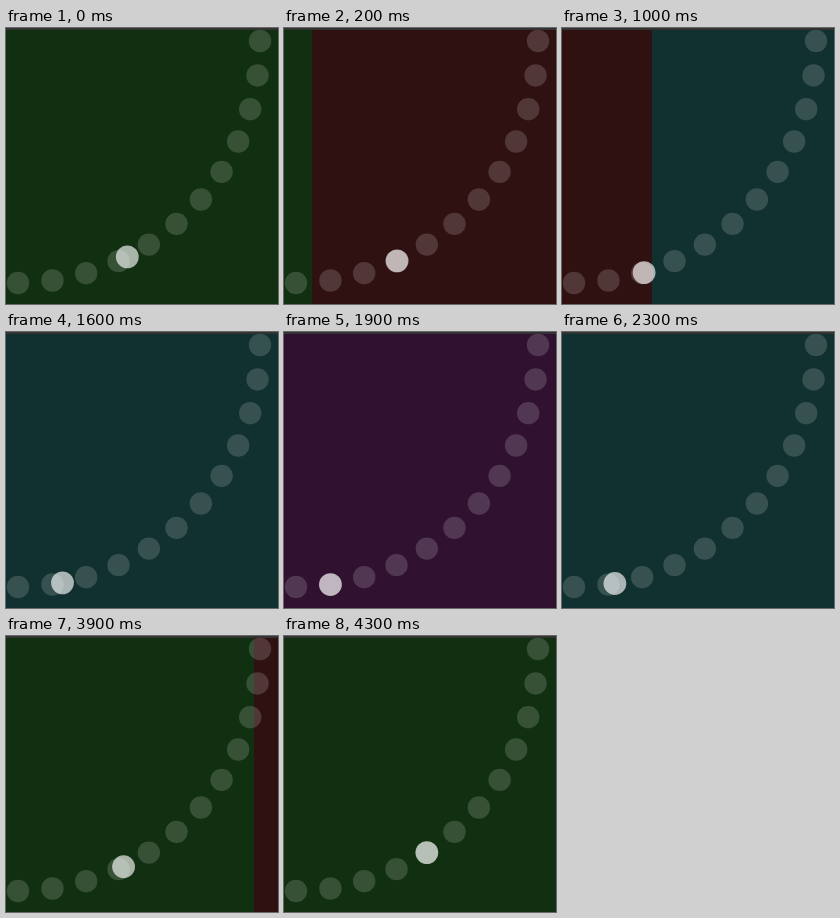
Animation of 272 by 276 pixels, one loop 4800 ms. Source, as an HTML page with a canvas:

```html
<!DOCTYPE html>
<html lang="en">
<head>
<meta charset="utf-8">
<title>Dial slider</title>
<style>
html, body { margin: 0; width: 100%; height: 100%; overflow: hidden; background: #113011; }
canvas { display: block; width: 272px; height: 276px; }
</style>
</head>
<body>
<canvas id="stage" width="272" height="276"></canvas>
<script>
const ctx = document.getElementById('stage').getContext('2d');
const W = 272, H = 276, LOOP = 4800, TICK = 100;
const SLIDE_W = 1537, SLIDES = ['#113011', '#301111', '#113030', '#301130'];
const CX = 12, CY = 13, RADIUS = 242, DOTS = 12, STEP = Math.PI / 2 / (DOTS - 1);
const HOME = 4, DURATION = 500;

// Each move starts at a time and goes from one slide to the next.
const MOVES = [
  { at: -213, from: 0, to: 1 },
  { at: 649, from: 1, to: 2 },
  { at: 1392, from: 2, to: 3 },
  { at: 2224, from: 3, to: 2 },
  { at: 3026, from: 2, to: 1 },
  { at: 3831, from: 1, to: 0 }
];

// cubic-bezier(.25, .1, .25, 1), settling at the very end
function ease(x) {
  if (x <= 0) return 0;
  if (x >= 0.9) return 1;
  let lo = 0, hi = 1;
  for (let i = 0; i < 24; i++) {
    const u = (lo + hi) / 2;
    if (0.75 * u * (1 - u) + u ** 3 < x) lo = u; else hi = u;
  }
  const u = lo, v = 1 - u;
  return 0.3 * u * v * v + 3 * v * u * u + u ** 3;
}

function position(t) {
  const move = MOVES.filter(m => m.at <= t).pop();
  return move.from + (move.to - move.from) * ease((t - move.at) / DURATION);
}

function disc(index, r, color) {
  const a = index * STEP;
  ctx.fillStyle = color;
  ctx.beginPath();
  ctx.arc(CX + RADIUS * Math.sin(a), CY + RADIUS * Math.cos(a), r, 0, Math.PI * 2);
  ctx.fill();
}

function draw(t) {
  const pos = position(t);
  SLIDES.forEach((color, i) => {
    ctx.fillStyle = color;
    ctx.fillRect(Math.round((i - pos) * SLIDE_W), 0, SLIDE_W + 1, H);
  });
  for (let i = 0; i < DOTS; i++) disc(i, 11.2, 'rgba(255,255,255,0.16)');
  disc(HOME - pos, 11.4, 'rgba(255,255,255,0.64)');
  ctx.fillStyle = '#333';
  ctx.fillRect(0, 0, W, 2);
}

const start = performance.now();
function frame() {
  const t = (performance.now() - start) % LOOP;
  draw(Math.floor(t / TICK) * TICK);
  requestAnimationFrame(frame);
}
frame();
</script>
</body>
</html>
```
